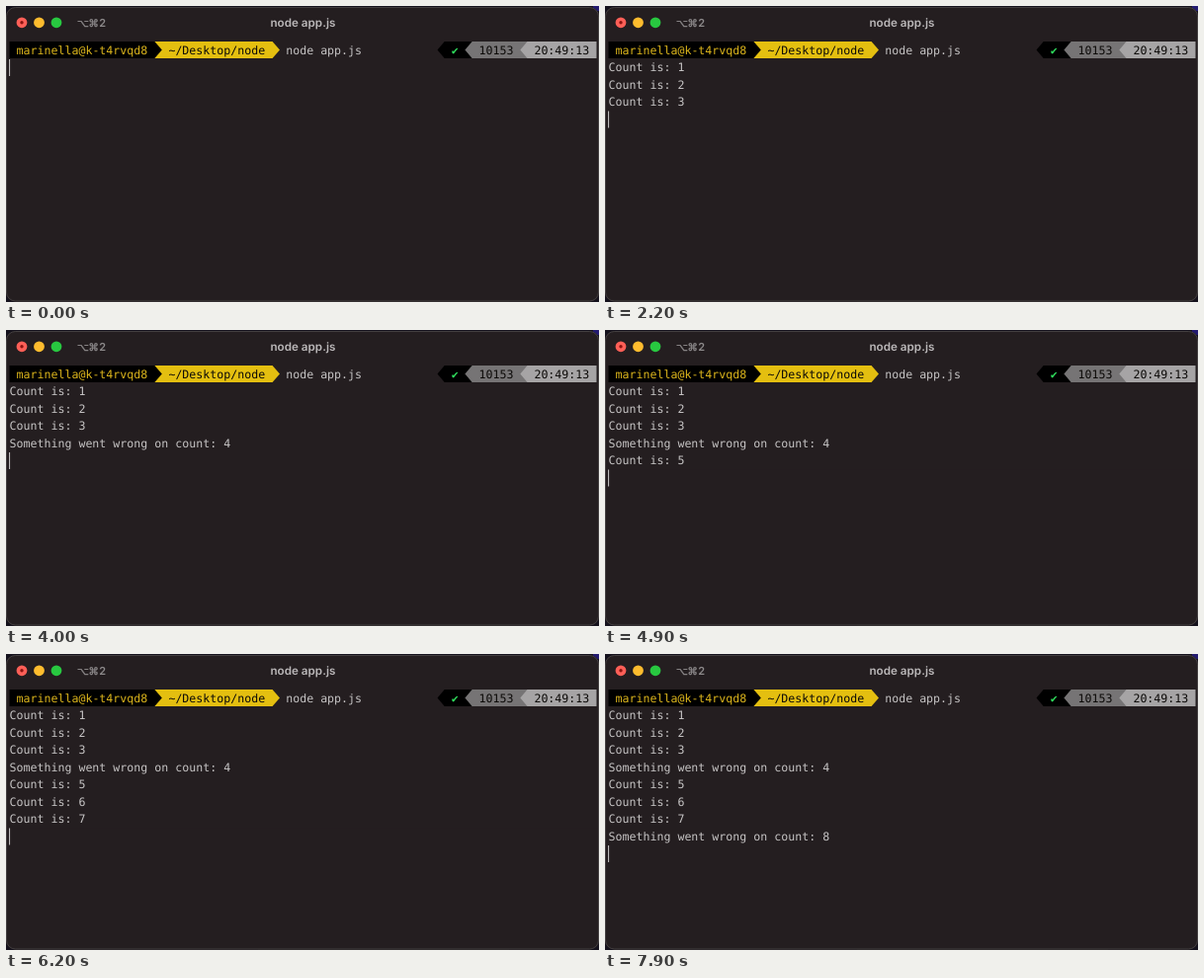
Recreate the animation shown at these times as an HTML page. Size 600x300 px, loop 8 s.

```html
<!DOCTYPE html>
<html lang="en">
<head>
<meta charset="utf-8">
<title>node app.js</title>
<style>
  html, body { margin: 0; width: 100%; height: 100%; overflow: hidden; background: #14111c; }
  svg { display: block; width: 600px; height: 300px; }
  text { font: 11.62px "DejaVu Sans Mono", monospace; fill: #c6c4c4; text-rendering: geometricPrecision; }
  .title { font: 600 11.7px Inter, sans-serif; fill: #bbb8b9; text-anchor: middle; }
  .hint { font: 600 11px Inter, sans-serif; fill: #8d8a8b; text-anchor: middle; }
  .key { font: 10.3px "DejaVu Sans", sans-serif; stroke: #8d8a8b; stroke-width: .35; }
  .user { fill: #dcb51c; }
  .dark { fill: #0c0a08; }
  .check { fill: #2fdc5c; text-anchor: middle; }

  /* Uncovers one output row per second */
  .rest { animation: print 8s infinite; }
  @keyframes print {
    0% { transform: translateY(0); animation-timing-function: step-end; }
    2.5% { transform: translateY(17.5px); animation-timing-function: steps(7, end); }
    90%, 100% { transform: translateY(140px); }
  }
</style>
</head>
<body>
<svg viewBox="0 0 600 300">
  <defs>
    <clipPath id="window"><rect y="1" width="600" height="298.5" rx="9"/></clipPath>
  </defs>

  <rect x="594" width="6" height="5" fill="#231a70"/>

  <g clip-path="url(#window)">
    <rect width="600" height="300" fill="#241e20"/>

    <circle cx="16" cy="16.8" r="5.4" fill="#ff5f57"/>
    <circle cx="16" cy="16.8" r="1.7" fill="#8c1410"/>
    <circle cx="33.5" cy="16.8" r="5.4" fill="#febc2e"/>
    <circle cx="51" cy="16.8" r="5.4" fill="#28c840"/>
    <text class="hint key" x="77.9" y="20.7">⌥</text>
    <text class="hint key" x="88.7" y="20.7">⌘</text>
    <text class="hint" x="97.8" y="21">2</text>
    <text class="title" x="300.4" y="21">node app.js</text>

    <!-- Prompt, left side -->
    <path d="M150 36H269.6L277 44.5 269.6 53H150Z" fill="#e4bf10"/>
    <path d="M3.5 36H150.4L157.8 44.5 150.4 53H3.5Z" fill="#000"/>
    <text class="user" x="10.5" y="49">marinella@k-t4rvqd8</text>
    <text class="dark" x="164.4" y="49">~/Desktop/node</text>
    <text x="283.2" y="49">node app.js</text>

    <!-- Prompt, right side -->
    <path d="M443.7 36H472V53H443.7L436.5 44.5Z" fill="#000"/>
    <path d="M471.6 36H528V53H471.6L464.4 44.5Z" fill="#767475"/>
    <path d="M527.5 36H597.5V53H527.5L520.3 44.5Z" fill="#a6a4a5"/>
    <text class="check" x="454.2" y="49">✔</text>
    <text class="dark" x="478.6" y="49">10153</text>
    <text class="dark" x="534.4" y="49">20:49:13</text>

    <g id="output"></g>

    <g class="rest">
      <rect y="53.5" width="600" height="260" fill="#241e20"/>
      <rect x="3" y="54" width="1.1" height="17" fill="#bbb9b9"/>
    </g>
  </g>
  <rect x=".5" y="1.5" width="599" height="297.5" rx="9" fill="none" stroke="#4b4748" stroke-width=".8"/>
</svg>
<script>
  const output = document.getElementById('output');
  for (let count = 1; count <= 8; count++) {
    const line = document.createElementNS('http://www.w3.org/2000/svg', 'text');
    line.setAttribute('x', 3.5);
    line.setAttribute('y', 48.8 + 17.5 * count);
    line.textContent = count % 4 ? `Count is: ${count}` : `Something went wrong on count: ${count}`;
    output.append(line);
  }
</script>
</body>
</html>
```
